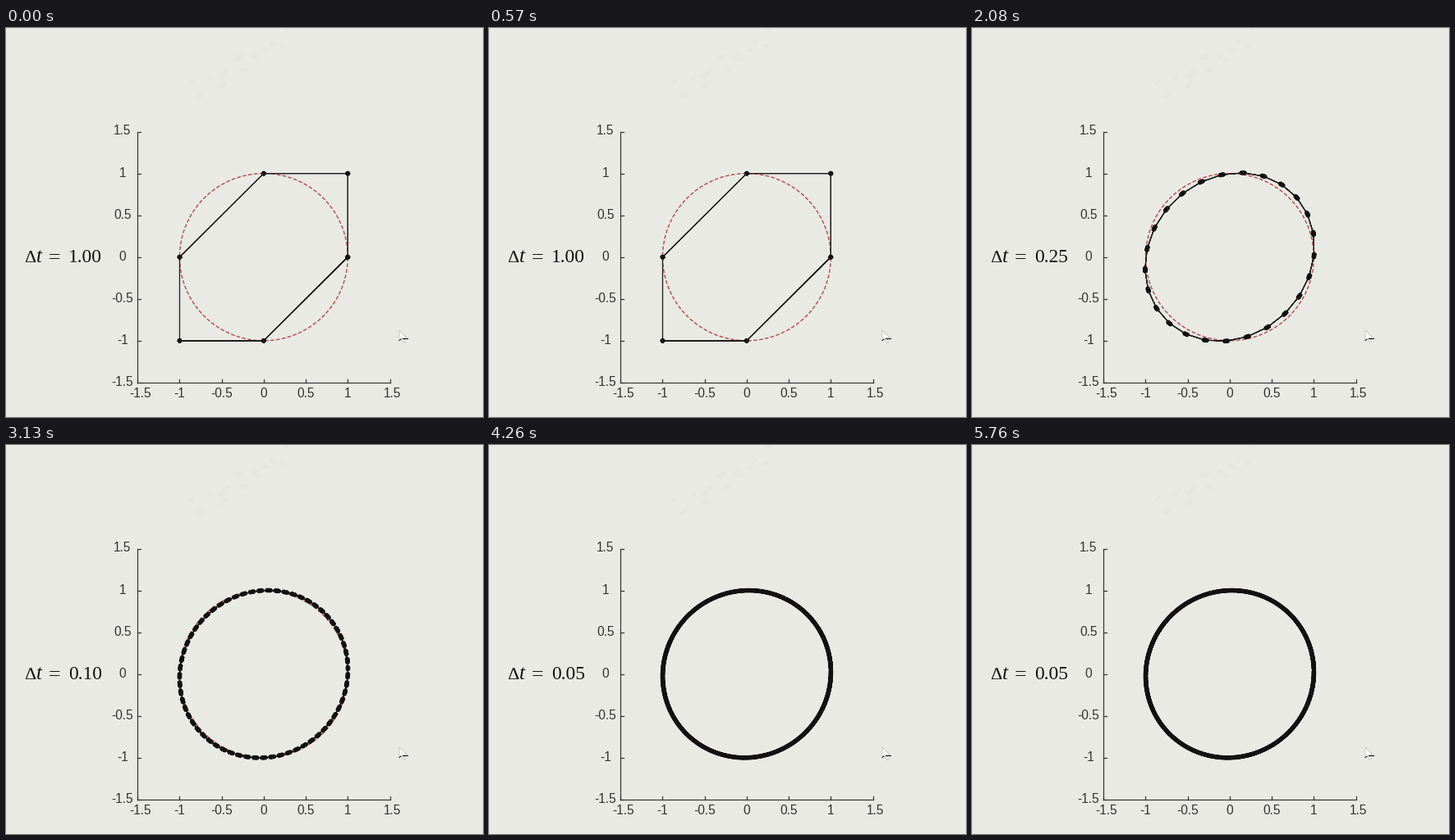
A matplotlib script that plays this animation: 581x475 px, repeating every 7280 ms.

```python
import math
import random

import matplotlib.pyplot as plt
import numpy as np
from matplotlib.animation import FuncAnimation
from matplotlib.patches import Ellipse, Polygon

W, H, DPI = 581, 475, 128
PX = 72 / DPI  # points per pixel
LOOP, STEP = 7280, 20
PAPER, INK, GREY, RED = "#e9eae4", "#12110f", "#333331", "#ba4650"
SERIF = "Liberation Serif"
TIME_STEPS = [1.0, 0.5, 0.25, 0.1, 0.05]
HOLD, LEAD = 1050, 20  # each stage's time; the first is cut short by LEAD


def to_px(x, y):
    return 313.9 + 102.4 * x, 279.7 - 102.1 * y


def orbit(dt):
    """Semi-implicit Euler for a unit oscillator over three periods."""
    x, v = 1.0, 0.0
    points = []
    for _ in range(int(6 * math.pi / dt)):
        points.append((x, v))
        v -= dt * x
        x += dt * v
    return to_px(*np.array(points).T)


def rings(xs, ys, radius=2.0):
    """One path holding a small circle round every point."""
    turn = np.append(np.linspace(0, 2 * math.pi, 17), np.nan)
    return (np.add.outer(xs, radius * np.cos(turn)).ravel(),
            np.add.outer(ys, radius * np.sin(turn)).ravel())


fig = plt.figure(figsize=(W / DPI, H / DPI), dpi=DPI, facecolor=PAPER)
ax = fig.add_axes([0, 0, 1, 1])
ax.set_xlim(0, W)
ax.set_ylim(H, 0)
ax.axis("off")


def line(xs, ys, color=GREY, width=1.2, **kw):
    return ax.plot(xs, ys, color=color, lw=width * PX, **kw)[0]


def label(x, y, s, size, font="Liberation Sans", color=GREY, **kw):
    return ax.text(x, y, s, fontsize=size * PX, fontfamily=font,
                   color=color, va="baseline", **kw)


def draw_smudges():
    """Faint flecks along a rising diagonal."""
    rng = random.Random(4)
    for k in range(14):
        x = 230 + 9 * k + rng.uniform(-8, 8)
        y = 76 - 5 * k + rng.uniform(-12, 12)
        ax.add_patch(Ellipse((x, y), rng.uniform(5, 12), rng.uniform(3, 7),
                             angle=rng.uniform(-60, 0), color="#e7e7e1", lw=0))


def draw_axes():
    left, bottom = to_px(-1.5, -1.5)
    right, top = to_px(1.5, 1.5)
    line([left, left], [top, bottom])
    line([left, right], [bottom, bottom])
    for k in range(-3, 4):
        x, y = to_px(k / 2, k / 2)
        line([x, x], [bottom, bottom - 3.5])
        line([left, left + 3.5], [y, y])
        text = f"{k / 2:g}"
        nudge = 3.5 if abs(k) == 3 else 0
        label(x + nudge, 450.6, text, 15.5, ha="center")
        label(142, y + 3.9, text, 15.5, ha="center")


def draw_cursor():
    arrow = [(479, 369), (479, 382), (482, 379.5), (484.5, 384.5),
             (486.5, 383.5), (484.5, 378.5), (488, 378)]
    ax.add_patch(Polygon(arrow, fc="#fbfbf9", ec="#b0b0ab", lw=0.6 * PX, zorder=5))
    line([483, 488.5], [378.7, 378.7], INK, 1.1, zorder=6)
    line([479, 481], [381.5, 380], INK, 1, zorder=6)


draw_smudges()
draw_axes()
draw_cursor()

angle = np.linspace(0, 2 * math.pi, 361)
line(*to_px(np.cos(angle), np.sin(angle)), RED, 1.4,
     dashes=(3.3, 1.7), dash_capstyle="butt")

path = line([], [], "#1e1d1b", 1.1, zorder=3)
dots = line([], [], INK, 1.6, zorder=4)

label(22, 286.5, "Δ", 22, SERIF, INK)
label(36.5, 286.5, "t", 25, SERIF, INK, style="italic")
label(51.5, 287, "=", 26, SERIF, INK)
value_text = label(76, 286.5, "", 23.5, SERIF, INK)

paths = [orbit(dt) for dt in TIME_STEPS]
markers = [rings(*points) for points in paths]


def update(i):
    now = i * STEP + STEP // 2
    stage = min((now + LEAD) // HOLD, len(TIME_STEPS) - 1)
    path.set_data(*paths[stage])
    dots.set_data(*markers[stage])
    value_text.set_text(f"{TIME_STEPS[stage]:.2f}")
    return path, dots, value_text


anim = FuncAnimation(fig, update, frames=LOOP // STEP, interval=STEP,
                     repeat=True, repeat_delay=0, blit=False)
plt.show()
```
